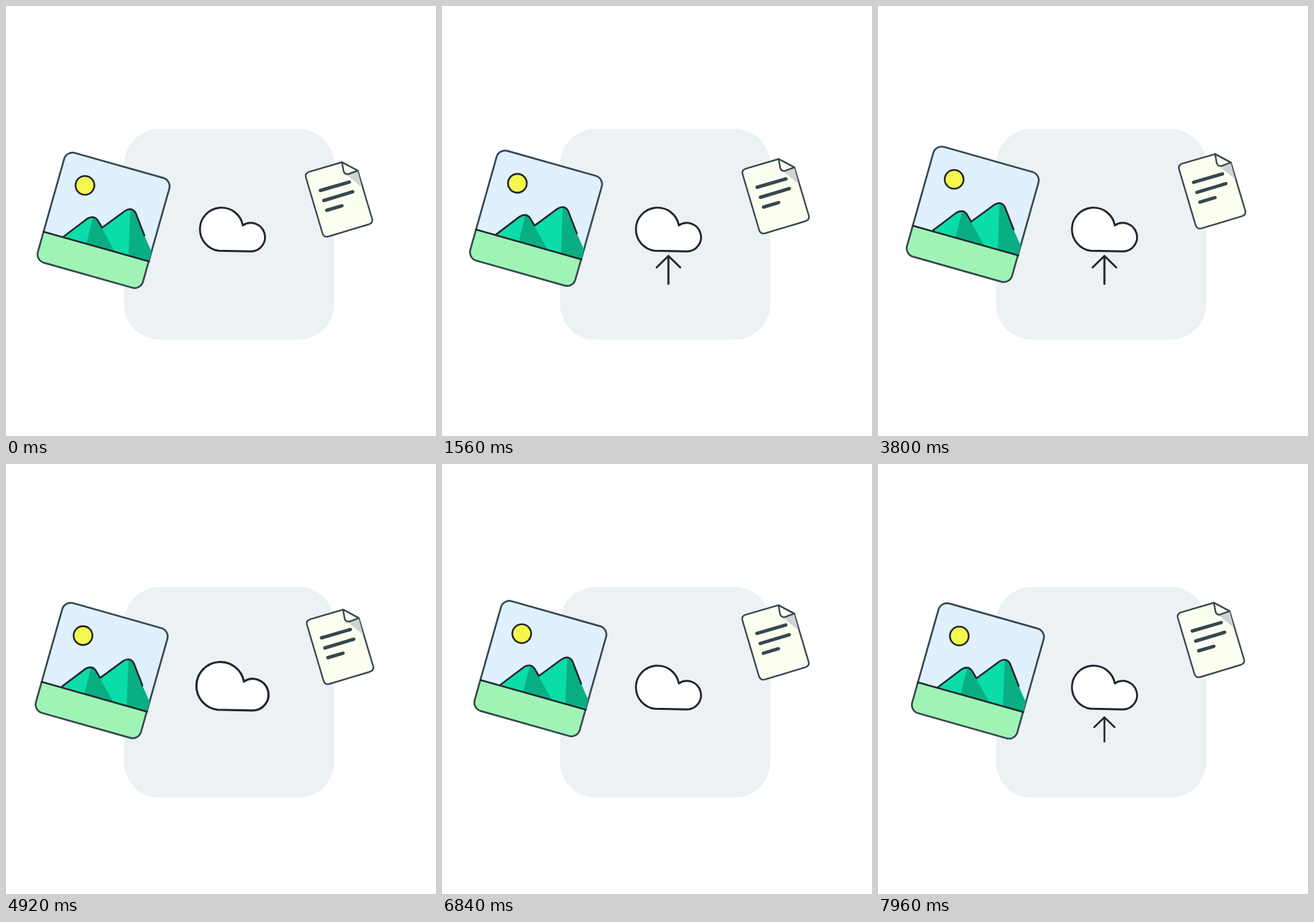
Write an HTML page that moves like this. It is 640x640 px and loops after 8 s.

```html
<!DOCTYPE html>
<html lang="en">
<head>
<meta charset="utf-8">
<title>Cloud upload</title>
<style>
  html, body { margin: 0; width: 100%; height: 100%; overflow: hidden; background: #fff; }
  svg { display: block; width: 100%; height: 100%; }
  .line { fill: none; stroke: #22252f; stroke-linecap: round; stroke-linejoin: round; }
  .edge { stroke: #37474f; stroke-linecap: round; stroke-linejoin: round; }
</style>
</head>
<body>
<svg viewBox="0 0 640 640">
  <defs>
    <rect id="card" x="63.9" y="234.1" width="162.6" height="169.8" rx="13" transform="rotate(15.8 145.2 319)"/>
    <clipPath id="inside"><use href="#card"/></clipPath>
  </defs>
  <rect x="175.7" y="183" width="312.8" height="313.5" rx="53" fill="#ecf1f4"/>

  <g id="picture">
    <use href="#card" fill="#dff0ff"/>
    <g clip-path="url(#inside)">
      <path d="M56 336L213 380.5L230 440H20Z" fill="#9ff4b5"/>
    </g>
    <use href="#card" class="edge" fill="none" stroke-width="2.7"/>
    <g clip-path="url(#inside)">
      <path d="M143 331L177 305Q187 298 193 308L206 342L217 367L213 380.5L130 357Z" fill="#0bdda8"/>
      <path d="M185 302Q190 302 193 308L206 342L217 367L213 380.5L182.500 372Z" fill="#0aae83"/>
      <path d="M86 343L121 316.500Q131 311 136.500 319L143 331L162.500 366Z" fill="#0bdda8"/>
      <path d="M129.500 314.500Q134 315 136.500 319L143 331L162.500 366L119.500 354Z" fill="#0aae83"/>
    </g>
    <path class="line" stroke-width="2.6" d="M56 336L213 380.300M86 343L121 316.500Q131 311 136.500 319L143 330L177 305Q187.500 298.500 193 308L206 341.500"/>
    <circle cx="117.500" cy="267" r="14" fill="#f4f84c" stroke="#22252f" stroke-width="2.6"/>
  </g>

  <g id="page" class="edge" fill="#fbfff0" stroke-width="2.4">
    <path d="M500 232.500L451 246.800Q444.500 249 446.500 255.500L470.800 337.500Q472.800 345 480 343L540 325Q546.500 322.500 545 317L523.500 245Z"/>
    <path d="M507 251L523.500 246L530 270Z" fill="#ced4d4" stroke="none"/>
    <path d="M500 232.500L523.500 245L510 250Q504.500 251.500 502.500 246Z"/>
    <path d="M468 274.500L511 262M473 289.500L516 276.500M477.500 304L500 297.300" stroke-width="5"/>
  </g>

  <path id="arrow" class="line" stroke-width="3.1" d="M0 20.500V-21M-17.500 -4L0 -21L17.500 -4"/>
  <path id="cloud" class="line" style="fill:#fff" stroke-width="2.9"
    d="M317 364.300A32.200 32.200 0 1 1 352.500 326.500A21.200 21.200 0 1 1 364 365.300Z"/>
</svg>
<script>
  const LOOP = 8000, STEP = 112, CYCLE = 7000;
  const [picture, page, arrow, cloud] =
    ["picture", "page", "arrow", "cloud"].map(id => document.getElementById(id));

  // Drift of the picture: seconds, x, y
  const drift = [
    [0, 0, 0], [1.12, -4.8, -2.3], [1.56, -5.3, -3.4], [2.68, -5.1, -6.4], [3.8, -4.1, -9.2],
    [4.92, -2.7, -11.9], [5.8, -1.1, -13.8], [6.4, 0.2, -14.8], [6.84, 1.2, -14.5], [8, 3.6, -10.9]
  ];

  const clamp = u => Math.max(0, Math.min(1, u));
  const smooth = u => u * u * (3 - 2 * u);
  const set = (el, value) => el.setAttribute("transform", value);

  function slope(i, k) {
    const a = drift[Math.max(0, i - 1)], b = drift[Math.min(drift.length - 1, i + 1)];
    return (b[k] - a[k]) / (b[0] - a[0]);
  }

  function along(s, k) {
    let i = 0;
    while (i < drift.length - 2 && s > drift[i + 1][0]) i++;
    const a = drift[i], b = drift[i + 1], d = b[0] - a[0], u = (s - a[0]) / d, v = 1 - u;
    return a[k] + (b[k] - a[k]) * smooth(u)
      + d * u * v * (v * slope(i, k) - u * slope(i + 1, k));
  }

  function draw(now) {
    const t = Math.floor(now % LOOP / STEP) * STEP, s = t / 1000;
    set(picture, `translate(${along(s, 1)} ${along(s, 2)})`);
    set(page, `translate(${1.7 - 0.112 * (s - 3.9) ** 2} ${-3.27 * s})`);

    // The arrow grows while rising, rests, then slips behind the cloud
    const c = (t + CYCLE - 180) % CYCLE;
    const grow = smooth(clamp(c / 1000)), leave = clamp((c - 3680) / 520) ** 2;
    const y = 393 + 48 * (1 - grow) ** 1.5 - 56 * leave;
    arrow.style.display = grow > 0 && leave < 1 ? "" : "none";
    set(arrow, `translate(337 ${y}) scale(${grow * (1 - 0.4 * leave)})`);

    const pulse = Math.sin(Math.PI * clamp((c - 4220) / 1100)) ** 2;
    set(cloud, `translate(337 351) scale(${1 + 0.126 * pulse}) translate(-337 -351)`);
  }

  const start = performance.now();
  function tick() {
    draw(performance.now() - start);
    requestAnimationFrame(tick);
  }
  tick();
</script>
</body>
</html>
```
